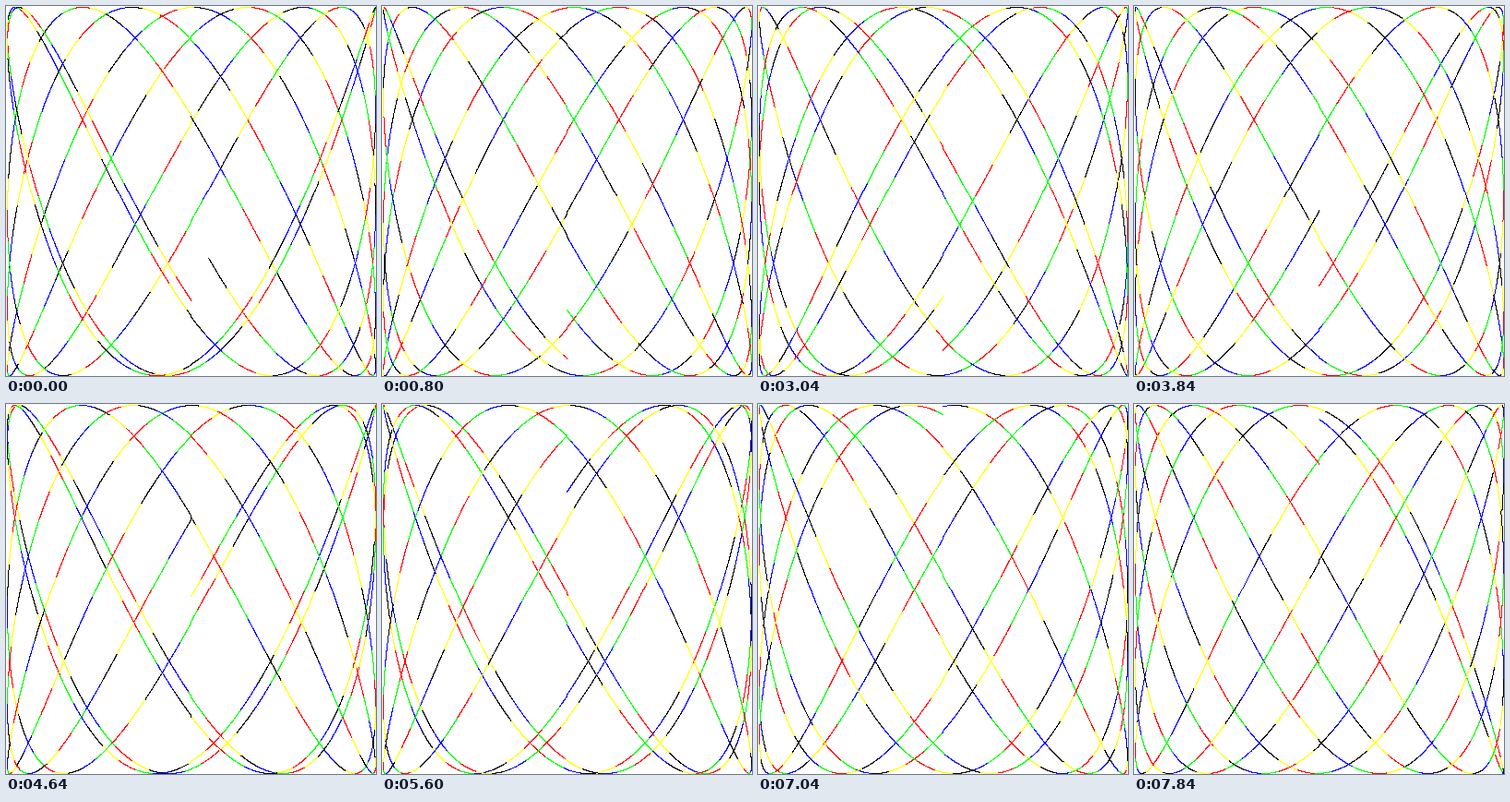
Recreate the animation shown at these times as an HTML page with a canvas. Size 401 by 401 pixels, loop 8000 ms.

```html
<!DOCTYPE html>
<html lang="en">
<head>
<meta charset="utf-8">
<title>Lissajous curve</title>
<style>
  html, body { margin: 0; width: 100%; height: 100%; overflow: hidden; background: #fff; }
  canvas { display: block; width: 401px; height: 401px; image-rendering: pixelated; }
</style>
</head>
<body>
<canvas id="stage" width="401" height="401"></canvas>
<script>
const RADIUS = 200;
const SIDE = 2 * RADIUS + 1;
const FRAME_MS = 160;
const FRAME_COUNT = 50;
const T_STEP = 0.001;
const POINTS = Math.ceil(10 * Math.PI / T_STEP);
const POINTS_PER_DASH = 97;
const FREQUENCY = 1.8139808639388588;
const FIRST_PHASE = 0.2;
const PHASE_STEP = 0.1;

const rgba = (r, g, b) => new Uint32Array(new Uint8Array([r, g, b, 255]).buffer)[0];
const WHITE = rgba(255, 255, 255);
const COLORS = [
  rgba(0, 0, 0),
  rgba(255, 255, 0),
  rgba(255, 0, 0),
  rgba(0, 255, 0),
  rgba(0, 0, 255)
];

const context = document.getElementById("stage").getContext("2d");
const image = context.createImageData(SIDE, SIDE);
const pixels = new Uint32Array(image.data.buffer);

// Truncating toward zero leaves the small kinks along both axes.
const toPixel = value => RADIUS + Math.trunc(value * RADIUS + 0.5);

// Dashes are counted across frames; the very first one is blank.
function dashColor(point) {
  const dash = Math.floor(point / POINTS_PER_DASH);
  return dash === 0 ? WHITE : COLORS[(dash - 1) % COLORS.length];
}

function draw(frame) {
  const phase = FIRST_PHASE + frame * PHASE_STEP;
  pixels.fill(WHITE);
  for (let i = 0; i < POINTS; i++) {
    const t = i * T_STEP;
    const x = toPixel(Math.sin(t));
    const y = toPixel(Math.sin(t * FREQUENCY + phase));
    pixels[y * SIDE + x] = dashColor(frame * POINTS + i);
  }
  context.putImageData(image, 0, 0);
}

const start = performance.now();
let shown = -1;

function tick() {
  const elapsed = performance.now() - start;
  const frame = Math.floor(elapsed / FRAME_MS) % FRAME_COUNT;
  if (frame !== shown) draw(shown = frame);
  requestAnimationFrame(tick);
}
tick();
</script>
</body>
</html>
```
